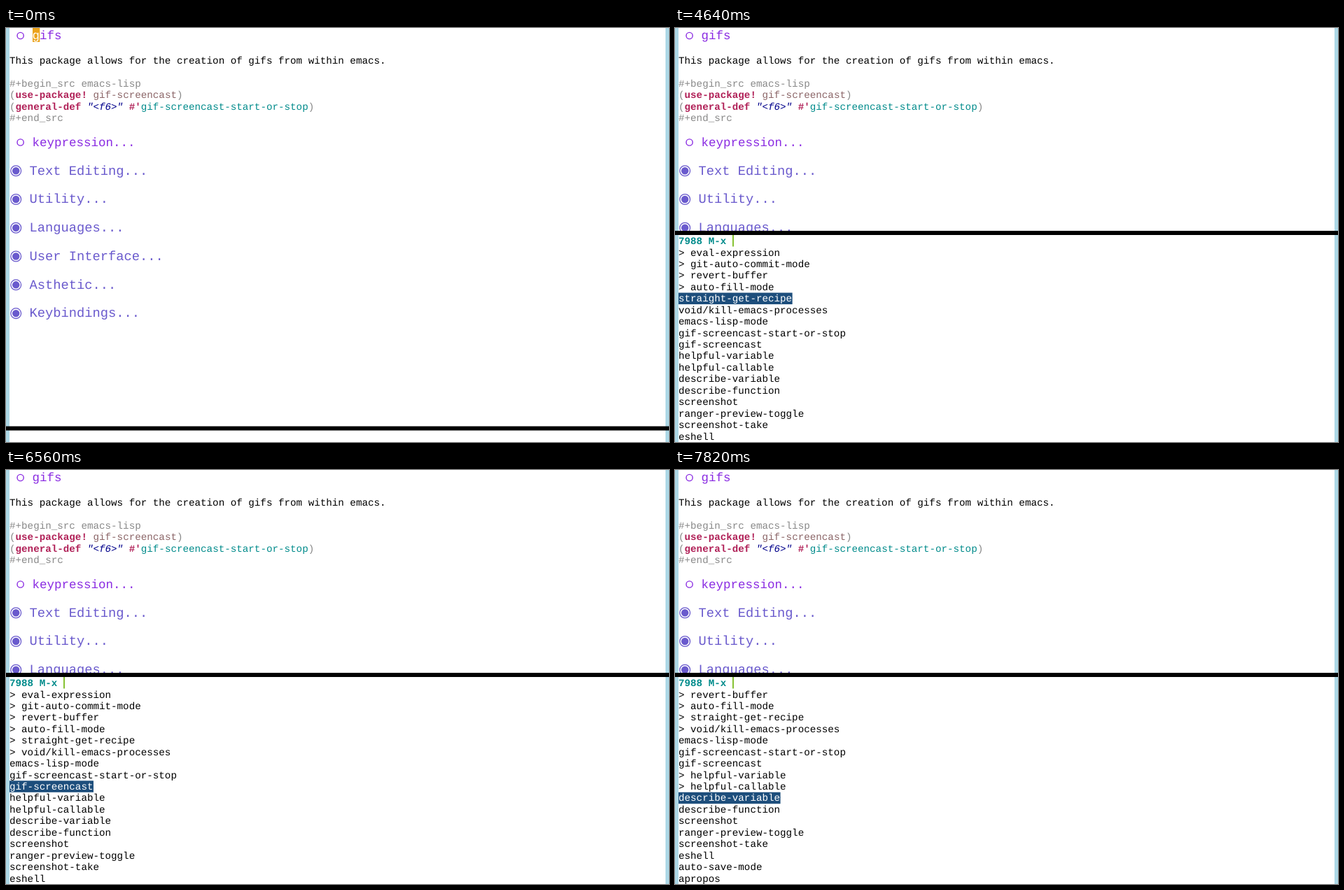
Animation, 947 px wide and 592 px high, one loop 8000 ms. Source, as an HTML page:

```html
<!DOCTYPE html>
<html lang="en">
<head>
<meta charset="utf-8">
<title>Command list</title>
<style>
html, body { margin: 0; width: 100%; height: 100%; overflow: hidden; background: #fff; }
svg { display: block; width: 947px; height: 592px; }
text {
  font: 14.22px "Liberation Mono", "DejaVu Sans Mono", monospace;
  white-space: pre;
  text-rendering: geometricPrecision;
}
.h1 { font-size: 18.75px; fill: #6a5acd; }
.h2 { font-size: 17.5px; fill: #8a2be2; }
.grey { fill: #888; }
.key { fill: #b02057; font-weight: bold; }
.name { fill: #8b6567; }
.str { fill: #00008b; font-style: italic; }
.fn { fill: #008b8b; }
.prompt { fill: #008b8b; font-weight: bold; }
</style>
</head>
<body>
<svg id="stage" viewBox="0 0 947 592">
  <defs><clipPath id="above"><rect id="view" width="947" height="570"/></clipPath></defs>
  <rect width="947" height="592" fill="#fff"/>
  <g id="doc" clip-path="url(#above)"></g>
  <rect width="5" height="592" fill="#add8e6"/>
  <rect x="942" width="5" height="592" fill="#add8e6"/>
  <rect id="divider" width="947" height="6"/>
  <g id="panel">
    <text class="prompt" x="5" y="309">7988 M-x </text>
    <rect x="82" y="296" width="2" height="16.5" fill="#86c232"/>
    <rect id="mark" x="5" height="16.5" fill="#1d4e7c"/>
    <g id="rows"></g>
  </g>
</svg>
<script>
const LOOP = 8000, CHAR = 8.533, LINE = 16.44, ROWS = 17, MAX_ROW = 9;
const commands = ["eval-expression", "git-auto-commit-mode", "revert-buffer",
  "auto-fill-mode", "straight-get-recipe", "void/kill-emacs-processes",
  "emacs-lisp-mode", "gif-screencast-start-or-stop", "gif-screencast",
  "helpful-variable", "helpful-callable", "describe-variable",
  "describe-function", "screenshot", "ranger-preview-toggle",
  "screenshot-take", "eshell", "auto-save-mode", "apropos"];
const unmarked = new Set([6, 7, 8]);
// Each time moves the selection down by one command.
const steps = [1000, 3980, 4340, 4640, 4960, 5290, 5620, 6560, 6810, 7090, 7820];

const $ = id => document.getElementById(id);

function add(parent, tag, attrs, content) {
  const el = document.createElementNS("http://www.w3.org/2000/svg", tag);
  for (const k in attrs) el.setAttribute(k, attrs[k]);
  if (content) el.textContent = content;
  return parent.appendChild(el);
}

function line(y, ...spans) {
  const t = add(doc, "text", { x: 5, y });
  for (const [cls, s] of spans) add(t, "tspan", { class: cls }, s);
}

function subheading(y, s) {
  add(doc, "circle", { cx: 20.6, cy: y - 5, r: 4.6, fill: "none", stroke: "#8a2be2", "stroke-width": 1.4 });
  return add(doc, "text", { class: "h2", x: 37.5, y }, s);
}

const doc = $("doc");
const block = add(doc, "rect", { x: 38, y: 0, width: 10.3, height: 20, fill: "#eba31c" });
const title = subheading(16, "");
const initial = add(title, "tspan", {}, "g");
add(title, "tspan", {}, "ifs");
line(51, ["", "This package allows for the creation of gifs from within emacs."]);
line(83.5, ["grey", "#+begin_src emacs-lisp"]);
line(100, ["grey", "("], ["key", "use-package!"], ["name", " gif-screencast"], ["grey", ")"]);
line(116.5, ["grey", "("], ["key", "general-def"], ["str", ' "<f6>" '], ["key", "#'"],
  ["fn", "gif-screencast-start-or-stop"], ["grey", ")"]);
line(133, ["grey", "#+end_src"]);
subheading(168.5, "keypression...");
["Text Editing", "Utility", "Languages", "User Interface", "Asthetic", "Keybindings"].forEach((s, i) => {
  const y = 209.5 + i * 40.78, c = { cx: 14.2, cy: y - 5.3 };
  add(doc, "circle", { ...c, r: 7.4, fill: "none", stroke: "#6a5acd", "stroke-width": 1.3 });
  add(doc, "circle", { ...c, r: 5.2, fill: "#6a5acd" });
  add(doc, "text", { class: "h1", x: 33.6, y }, s + "...");
});

const rowY = i => 325.5 + i * LINE;
const rows = Array.from({ length: ROWS }, (_, i) => add($("rows"), "text", { x: 5, y: rowY(i) }));

function draw(t) {
  const sel = steps.filter(s => t >= s).length, open = sel > 0;
  block.style.display = open ? "none" : "";
  initial.style.fill = open ? "" : "#fff";
  $("divider").setAttribute("y", open ? 290 : 569.5);
  $("view").setAttribute("height", open ? 290 : 570);
  $("panel").style.display = open ? "" : "none";
  if (!open) return;

  const top = Math.max(0, sel - MAX_ROW);
  rows.forEach((row, i) => {
    const n = top + i, marked = n < sel && !unmarked.has(n);
    row.textContent = (marked ? "> " : "") + commands[n];
    row.style.fill = n === sel ? "#fff" : "#000";
  });
  $("mark").setAttribute("y", rowY(sel - top) - 12.7);
  $("mark").setAttribute("width", commands[sel].length * CHAR + 0.5);
}

const start = performance.now();
function tick() {
  draw((performance.now() - start) % LOOP);
  requestAnimationFrame(tick);
}
tick();
</script>
</body>
</html>
```
